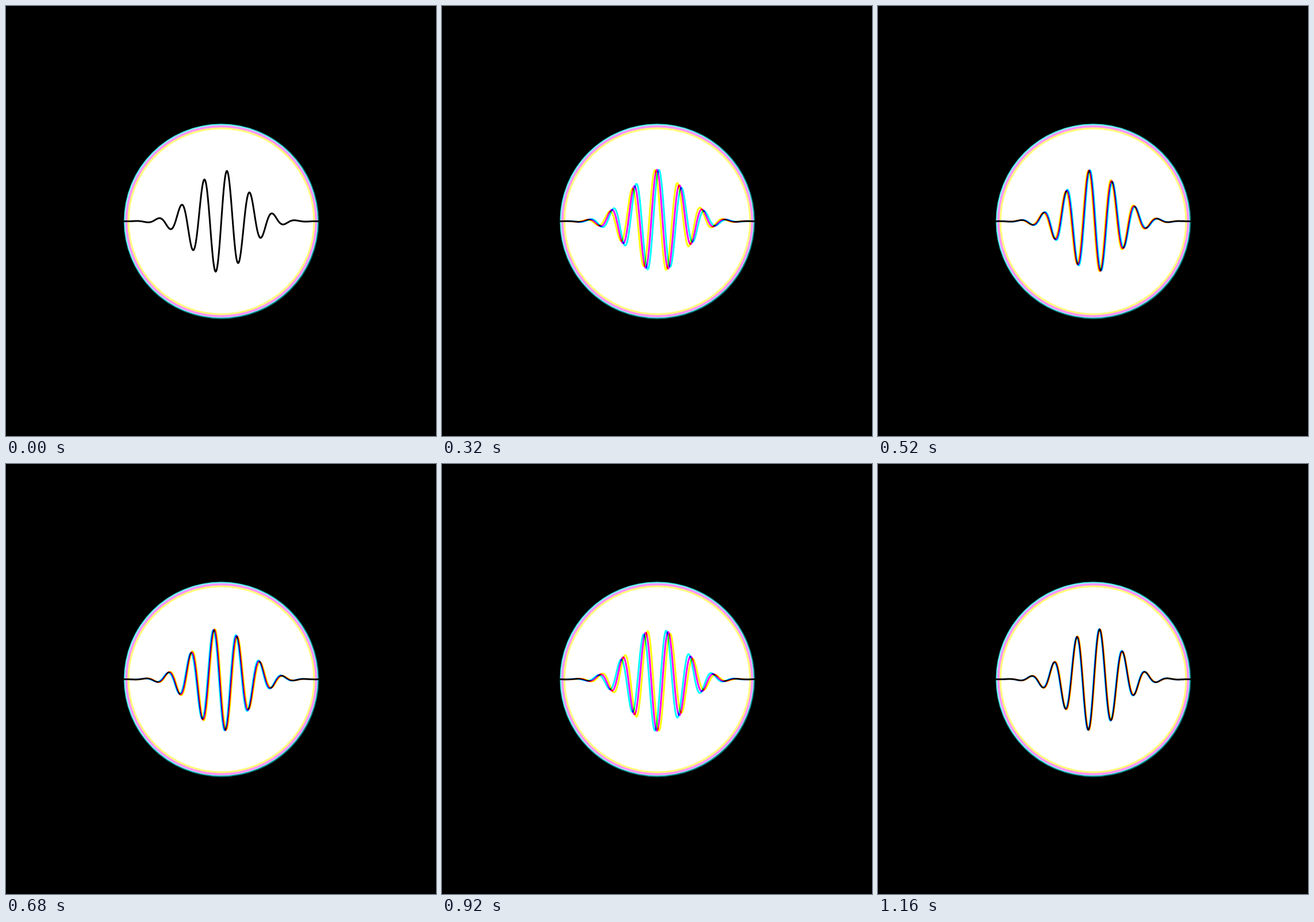
An HTML page with a canvas that plays this animation: 748 px wide and 748 px high, repeating every 1200 ms.

```html
<!DOCTYPE html>
<html lang="en">
<head>
<meta charset="utf-8">
<title>Wave packet</title>
<style>
  html, body { margin: 0; width: 100%; height: 100%; overflow: hidden; background: #000; }
  canvas { display: block; }
</style>
</head>
<body>
<canvas width="748" height="748"></canvas>
<script>
const ctx = document.querySelector('canvas').getContext('2d');
const LOOP = 1200, STEP = 40, TAU = 2 * Math.PI;
const C = 374.5;            // centre of the disc
const HALF = 170;           // half length of the wave
const AMP = 89.7, SPREAD = 4200, K = TAU / 39.8;
const SPLIT = 0.57;         // largest phase gap between the inks

function circle(x, r) {
  ctx.beginPath();
  ctx.arc(x, x, r, 0, TAU);
}

function ring(r, width, color) {
  circle(C, r);
  ctx.lineWidth = width;
  ctx.strokeStyle = color;
  ctx.stroke();
}

function wave(phase, color) {
  ctx.beginPath();
  for (let d = -HALF; d <= HALF; d++) {
    ctx.lineTo(C + d, C - AMP * Math.exp(-d * d / SPREAD) * Math.sin(K * d + phase));
  }
  ctx.strokeStyle = color;
  ctx.stroke();
}

function draw(t) {
  ctx.globalCompositeOperation = 'source-over';
  ctx.fillStyle = '#000';
  ctx.fillRect(0, 0, 748, 748);
  ctx.fillStyle = '#fff';
  circle(C - 0.4, 168.5);
  ctx.fill();
  ring(161.7, 3.5, 'rgba(255,255,0,.5)');
  ring(165.2, 4, 'rgba(255,0,255,.42)');
  ring(168.4, 3, 'rgba(0,255,255,.5)');

  // Overlapping inks mix like print colours
  ctx.globalCompositeOperation = 'multiply';
  ctx.lineWidth = 3;
  ctx.lineJoin = 'round';
  const angle = TAU * t, gap = SPLIT * Math.sin(angle);
  wave(angle - gap, '#0ff');
  wave(angle, '#f0f');
  wave(angle + gap, '#ff0');
}

function frame() {
  const step = Math.floor((performance.now() + 1) / STEP);
  draw(step * STEP % LOOP / LOOP);
  requestAnimationFrame(frame);
}
frame();
</script>
</body>
</html>
```
